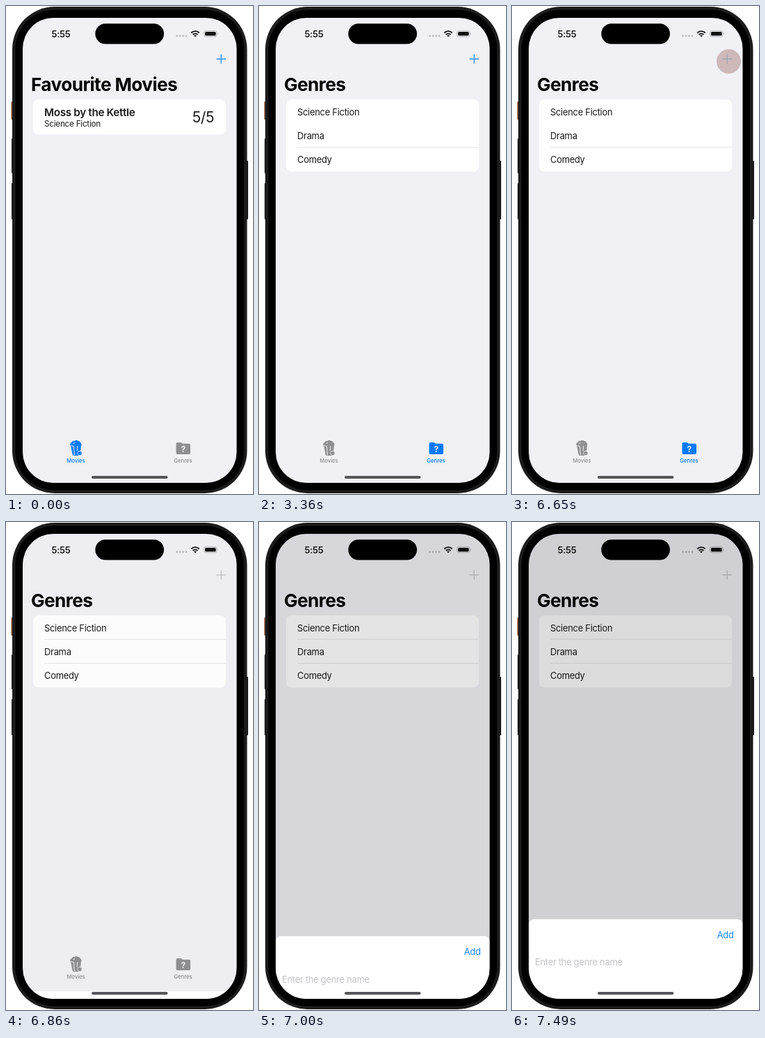
An HTML page for the animation above (8 s loop, 355 px wide and 700 px high).

```html
<!DOCTYPE html>
<html lang="en">
<head>
<meta charset="utf-8">
<title>Favourite Movies</title>
<style>
  html, body { margin: 0; width: 100%; height: 100%; overflow: hidden; background: #fff; }
  svg { display: block; width: 355px; height: 700px; }
  text { font: 12.9px Inter, Roboto, sans-serif; letter-spacing: -.02em; fill: #1a1a1a; }
  .title { font-size: 26.2px; font-weight: 700; letter-spacing: -.022em; fill: #000; }
  .movie { font-size: 15.2px; font-weight: 600; }
  .genre { font-size: 11.7px; }
  .score { font-size: 21px; text-anchor: end; }
  .clock { font-size: 13px; font-weight: 600; }
  .tab { font-size: 7.7px; font-weight: 500; letter-spacing: 0; text-anchor: middle; fill: currentColor; }
  .mark { font-size: 12px; font-weight: 700; text-anchor: middle; fill: #f0f0f5; }
  .add { fill: #1a84f5; }
  .hint { fill: #c4c4c7; }
  .line { stroke: #e3e3e6; stroke-width: .9; }
  .icon { fill: currentColor; }
  .cut { stroke: #f0f0f5; stroke-width: 1; fill: none; }
</style>
</head>
<body>
<svg viewBox="0 0 355 700">
  <clipPath id="screen"><rect x="24" y="17" width="307.5" height="667" rx="44"/></clipPath>

  <!-- Phone body and side buttons -->
  <g fill="#1c1c1c">
    <rect x="7.5" y="137" width="4" height="26" rx="1" fill="#8a4a32"/>
    <rect x="8" y="190" width="4" height="50" rx="1"/>
    <rect x="8" y="254" width="4" height="52" rx="1"/>
    <rect x="344" y="222" width="4" height="84" rx="1"/>
    <rect x="9" y="1" width="337.5" height="698" rx="61"/>
  </g>
  <rect x="13.5" y="5.5" width="328.5" height="689" rx="56"/>

  <g clip-path="url(#screen)">
    <rect x="24" y="17" width="308" height="667" fill="#f0f0f5"/>

    <g id="movies">
      <text class="title" x="36" y="121.5">Favourite Movies</text>
      <rect x="39" y="134" width="277" height="50.5" rx="8" fill="#fff"/>
      <text class="movie" x="55" y="157.6">Moss by the Kettle</text>
      <text class="genre" x="55" y="173">Science Fiction</text>
      <text class="score" x="299" y="167.3">5/5</text>
    </g>

    <g id="genres">
      <text class="title" x="36" y="121.5">Genres</text>
      <rect x="39" y="134" width="277" height="103.5" rx="8" fill="#fff"/>
      <path id="rule" class="line" d="M55 168.2H316"/>
      <path class="line" d="M55 202.7H316"/>
      <text x="55" y="156.5">Science Fiction</text>
      <text x="55" y="190.8">Drama</text>
      <text x="55" y="225.2">Comedy</text>
    </g>

    <circle id="touch" cx="311.5" cy="79.5" r="17.5" fill="#cdb8ba"/>
    <path id="plus" d="M302.5 76H316M309.25 69.3V82.7" stroke-width="1.4"/>

    <!-- Tab bar -->
    <g id="tabMovies">
      <path class="icon" d="M93 630.5a2.6 2.6 0 0 1 1.5-4.5a3 3 0 0 1 4-2a3 3 0 0 1 5 0a2.800 2.800 0 0 1 3.500 2.500a2.600 2.600 0 0 1 1 4l-1.500 12.500q-.3 2-2 2h-7q-1.700 0-2-2z"/>
      <path class="cut" d="M93.500 630.500l4 1.200M97.300 631.500l1.200 13M102.500 631l-.3 7M96.500 627.500l2.500-.8"/>
      <circle class="cut" cx="106" cy="641.500" r="3.200"/>
      <circle class="icon" cx="106" cy="641.500" r="2.700"/>
      <text class="tab" x="100.500" y="654.800">Movies</text>
    </g>
    <g id="tabGenres">
      <path class="icon" d="M244.500 628q0-2 2-2h4.500q1 0 1.700.7l1 1.100h9.300q2 0 2 2V641q0 2-2 2h-16.500q-2 0-2-2z"/>
      <text class="mark" x="254.700" y="639.500">?</text>
      <text class="tab" x="254.500" y="654.800">Genres</text>
    </g>

    <!-- Status bar -->
    <text class="clock" x="65.500" y="44.500">5:55</text>
    <g fill="#b9b9be">
      <circle cx="245.500" cy="43" r="1.400"/><circle cx="250" cy="43" r="1.400"/>
      <circle cx="254.500" cy="43" r="1.400"/><circle cx="259" cy="43" r="1.400"/>
    </g>
    <g fill="none" stroke="#111" stroke-width="1.900">
      <path d="M266.300 38.500a8 8 0 0 1 11.400 0M268.600 41a4.800 4.800 0 0 1 6.800 0"/>
      <path d="M270 42.300L272 44.500L274 42.300Q272 41 270 42.300z" fill="#111" stroke="none"/>
    </g>
    <rect x="284.500" y="35.500" width="18.500" height="8.500" rx="2.700" fill="none" stroke="#aaaab0" stroke-width=".8"/>
    <rect x="286" y="36.900" width="15.600" height="5.700" rx="1.500" fill="#111"/>
    <path d="M304.200 38.300q1.600 1.400 0 3z" fill="#aaaab0"/>

    <rect id="dim" x="24" y="17" width="308" height="667"/>

    <g id="sheet">
      <rect x="24" width="307.500" height="150" rx="8" fill="#fff"/>
      <text class="add" x="294.700" y="27.300">Add</text>
      <text class="hint" x="33" y="66.700">Enter the genre name</text>
    </g>
    <rect x="123" y="674" width="109.500" height="4" rx="2" fill="#56565a"/>
  </g>
  <rect x="128.300" y="25.200" width="98.700" height="29.300" rx="14.650"/>
</svg>

<script>
  const LOOP = 8000, STEP = 70;
  const SWITCH = 3360, TAP = 6650, RELEASE = 6790, RISE = 6830;
  const BLUE = '#007aff', GREY = '#8f8f94';
  const el = id => document.getElementById(id);
  const show = (id, on) => el(id).style.display = on ? '' : 'none';
  const tint = (id, on) => el(id).style.color = on ? BLUE : GREY;

  // Critically damped spring from 0 to 1
  function spring(ms) {
    const x = Math.max(0, ms) * .0171;
    return 1 - (1 + x) * Math.exp(-x);
  }

  function draw(time) {
    const t = Math.floor(time % LOOP / STEP) * STEP;
    const onGenres = t >= SWITCH, open = t >= RELEASE;
    const touched = t >= TAP && !open;
    const p = spring(t - RISE);

    show('movies', !onGenres);
    show('genres', onGenres);
    show('rule', open);
    show('touch', touched);
    tint('tabMovies', !onGenres);
    tint('tabGenres', onGenres && !open);
    el('plus').setAttribute('stroke', touched ? '#a0a4ad' : open ? '#c8c8cb' : '#3290f4');
    el('dim').setAttribute('opacity', .137 * p);
    el('sheet').setAttribute('transform', `translate(0 ${684 - 114.3 * p})`);
  }

  const start = performance.now();
  function frame() {
    draw(performance.now() - start);
    requestAnimationFrame(frame);
  }
  frame();
</script>
</body>
</html>
```
